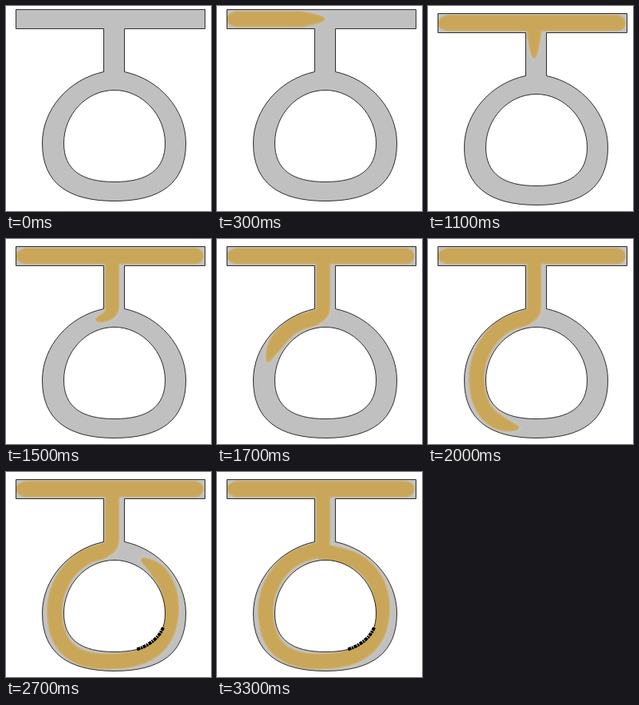
These frames come from a looping animation (257 px wide and 257 px high, 3400 ms). An HTML page with a canvas:

```html
<!DOCTYPE html>
<html>
<head>
<meta charset="utf-8">
<style>
html, body { margin: 0; width: 100%; height: 100%; overflow: hidden; background: #fff; }
canvas { display: block; }
</style>
</head>
<body>
<canvas id="stage" width="257" height="257"></canvas>
<script>
const ctx = document.getElementById('stage').getContext('2d');
const LOOP = 3400, STEP = 100, SHIFT_AT = 800;

const letter = new Path2D(
  'M12.5 4.5H249.5V28.5H148.5V82.5C193 92 225.5 130 225.5 172C225.5 222 194 244.5 136 244.5' +
  'C78 244.5 45.5 222 45.5 172C45.5 130 78 92 122.5 82.5V28.5H12.5Z' +
  'M136 105.5C100 105.5 72.5 137 72.5 172C72.5 205 94 220.5 136 220.5' +
  'C178 220.5 199.5 205 199.5 172C199.5 137 171 105.5 136 105.5Z');
const smudge = new Path2D('M197 190Q189 209 164 217.5');

// Points one pixel apart along a stroke
function sample(d) {
  const path = document.createElementNS('http://www.w3.org/2000/svg', 'path');
  path.setAttribute('d', d);
  return Array.from({ length: Math.ceil(path.getTotalLength()) + 1 },
    (_, i) => path.getPointAtLength(i));
}
const bar = sample('M20 16.5H238');
const loop = sample(
  'M133 24V80C133 90 126 93 112 97C84 104 61 136 61 168C61 205 76 228 115 232' +
  'C175 236 207 215 207 165C207 135 190 112 166 103C152 98 140 96 130 95');

// Linear interpolation through [time, value] pairs
function track(keys, t) {
  if (t <= keys[0][0]) return keys[0][1];
  for (let i = 1; i < keys.length; i++) {
    const [t0, a] = keys[i - 1], [t1, b] = keys[i];
    if (t < t1) return a + (b - a) * (t - t0) / (t1 - t0);
  }
  return keys[keys.length - 1][1];
}
const barKeys = [[0, 0], [300, 115], [700, bar.length]];
const loopKeys = [[800, 0], [1500, 85], [2000, 272], [2700, 481], [3000, loop.length]];

// Brush mark as one shape of overlapping discs, tapered towards its tip
function brush(points, length, grow) {
  const shape = new Path2D();
  const taper = 1 + Math.min(28, points.length - length);
  for (let i = 0; i < length; i++) {
    const width = points === loop && i < 75 ? 9 : 9.9;
    const r = grow + width * Math.sqrt(Math.min(1, (length - i) / taper, (i + 8) / 12));
    const p = points[i];
    shape.moveTo(p.x + r, p.y);
    shape.arc(p.x, p.y, r, 0, 7);
  }
  return shape;
}

function paint(t, color, grow, blur) {
  ctx.filter = `blur(${blur}px)`;
  ctx.fillStyle = color;
  ctx.fill(brush(bar, track(barKeys, t), grow));
  ctx.fill(brush(loop, track(loopKeys, t), grow));
  ctx.filter = 'none';
}

function draw(now) {
  const t = Math.floor(now % LOOP / STEP) * STEP;

  ctx.fillStyle = '#fff';
  ctx.fillRect(0, 0, 257, 257);
  ctx.save();
  ctx.translate(0, t >= SHIFT_AT ? 5 : 0);
  ctx.fillStyle = '#c0c0c0';
  ctx.fill(letter, 'evenodd');

  ctx.save();
  ctx.clip(letter, 'evenodd');
  paint(t, '#c8cacc', 2, 1.2);
  paint(t, '#c9a658', 0, 1.2);
  ctx.restore();

  ctx.strokeStyle = '#000';
  ctx.lineWidth = 0.8;
  ctx.stroke(letter);
  if (t >= 2400) {
    ctx.lineWidth = 4;
    ctx.setLineDash([4, 1, 2, 1]);
    ctx.stroke(smudge);
  }
  ctx.restore();
}

const start = performance.now();
function frame() {
  draw(performance.now() - start);
  requestAnimationFrame(frame);
}
frame();
</script>
</body>
</html>
```
